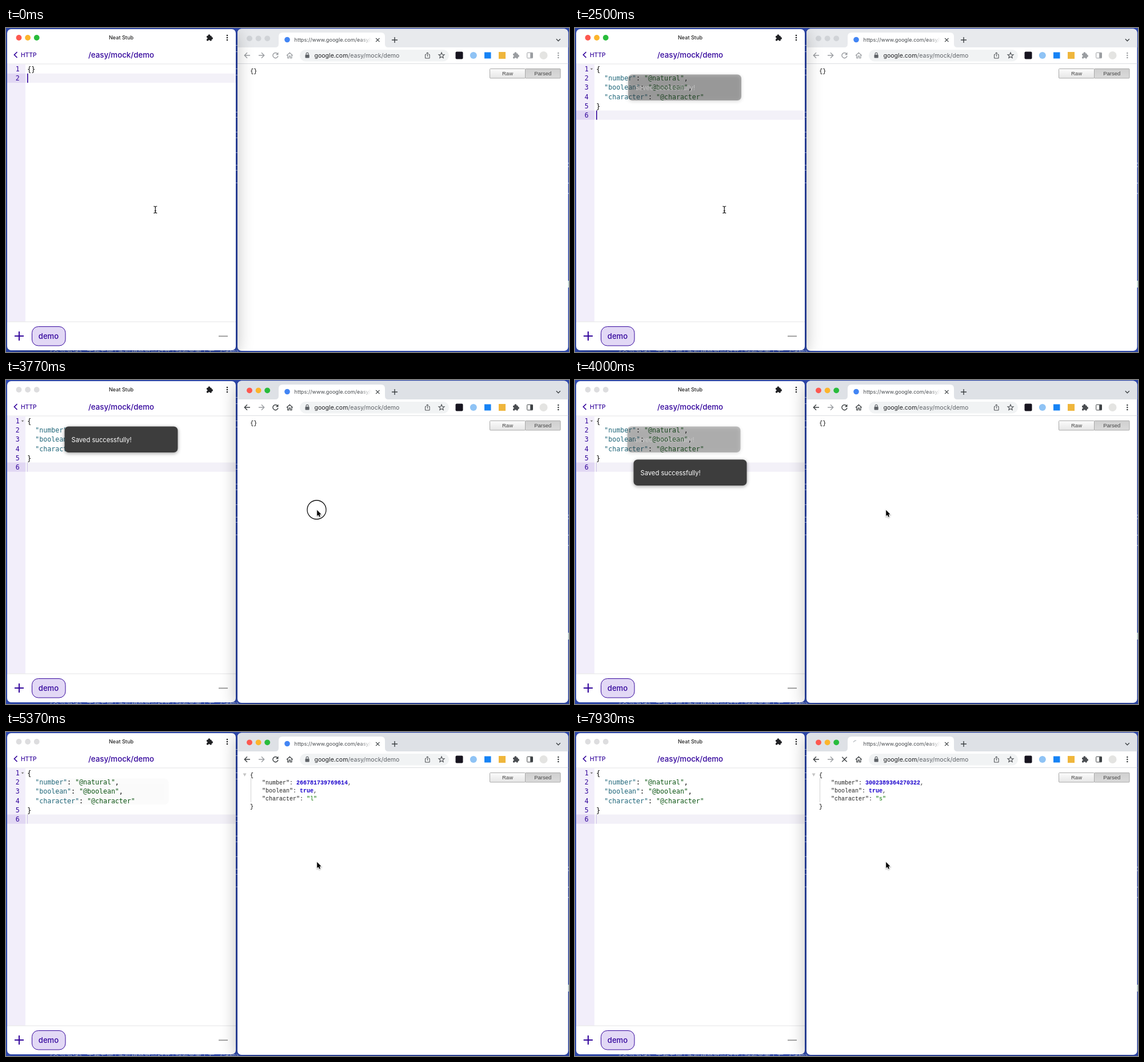
An HTML page with a canvas that plays this animation: 985 by 568 pixels, repeating every 8000 ms.

```html
<!DOCTYPE html>
<html lang="en">
<head>
<meta charset="utf-8">
<style>
html, body { margin: 0; width: 985px; height: 568px; overflow: hidden; }
canvas { display: block; }
</style>
</head>
<body>
<canvas id="stage" width="985" height="568"></canvas>
<script>
const ctx = document.getElementById('stage').getContext('2d');
const LOOP = 8000, FOCUS_SWAP = 3740, PASTE = 1930;
const PURPLE = '#33059c', KEY = '#1f6679', STRING = '#0b5512';
const UI = 'Inter, sans-serif', CODE = '"DejaVu Sans Mono", monospace';
const JSON_FONT = '"Liberation Mono", monospace';
const ROW = 16.2, ROW_TOP = 63.6;
const LOADS = [[4430, 4760, 5030], [6030, 6370, 6600], [7730, 8100, 8400]];
const TOASTS = [[2440, 3912], [3775, 5243]];
const CARET = [[0, 500], [1000, 1530], [PASTE, 3000], [3530, FOCUS_SWAP]];

const clamp = v => Math.max(0, Math.min(1, v));
const within = (t, [a, b]) => t >= a && t < b;

function text(s, x, y, size, color, { font = UI, weight = 400, align = 'left' } = {}) {
  ctx.font = `${weight} ${size}px ${font}`;
  ctx.textAlign = align;
  ctx.fillStyle = color;
  ctx.fillText(s, x, y);
  return ctx.measureText(s).width;
}

// Draws [text, color, weight] pieces one after another.
function pieces(list, x, y, size, font) {
  for (const [s, color, weight] of list) x += text(s, x, y, size, color, { font, weight });
}

function rect(x, y, w, h, color) {
  ctx.fillStyle = color;
  ctx.fillRect(x, y, w, h);
}

function box(x, y, w, h, r, fill, stroke) {
  ctx.beginPath();
  ctx.roundRect(x, y, w, h, r);
  if (fill) { ctx.fillStyle = fill; ctx.fill(); }
  if (stroke) { ctx.strokeStyle = stroke; ctx.lineWidth = 1; ctx.stroke(); }
}

function dot(x, y, r, color) {
  ctx.beginPath();
  ctx.arc(x, y, r, 0, 7);
  ctx.fillStyle = color;
  ctx.fill();
}

function path(d, x, y, color, width) {
  const p = new Path2D(d);
  ctx.save();
  ctx.translate(x, y);
  if (width) {
    ctx.strokeStyle = color;
    ctx.lineWidth = width;
    ctx.stroke(p);
  } else {
    ctx.fillStyle = color;
    ctx.fill(p);
  }
  ctx.restore();
}

function shadowed(color, blur, dy, draw) {
  ctx.save();
  ctx.shadowColor = color;
  ctx.shadowBlur = blur;
  ctx.shadowOffsetY = dy;
  draw();
  ctx.restore();
}

function trafficLights(x, y, active) {
  const colors = active ? ['#fd5850', '#fcb52c', '#28bc3c'] : Array(3).fill(x < 400 ? '#dddddf' : '#d0d3d7');
  colors.forEach((c, i) => dot(x + 15.6 * i, y, 4.9, c));
}

function moreDots(x, y, color) {
  for (const d of [-4, 0, 4]) dot(x, y + d, 1.3, color);
}

function puzzle(x, y, color) {
  box(x - 5, y - 3.2, 8.8, 8.6, 1, color);
  dot(x - .6, y - 3.7, 2, color);
  dot(x + 4, y + 1, 2, color);
  dot(x - 5, y + 1, 1.6, '#fff');
  dot(x - .6, y + 5.6, 1.6, '#fff');
}

function wallpaper() {
  rect(0, 0, 985, 568, '#304bb2');
  for (const y of [30, 41, 71, 82, 147, 156, 182, 192, 218, 240, 249, 271]) rect(401, y, 4, 1, '#a9b9ee');
  for (const y of [236, 242, 271, 289]) rect(983, y, 2, 2, '#7f9be0');
  rect(983, 443, 2, 12, '#c3e0e0');
  text('《会议沟通》 下载专家 | 手机相册可以打开 | 就在画面上有 《通知》', 70, 574, 11.5, '#a9b8d8',
    { font: '"Noto Sans CJK SC", "Noto Sans CJK", sans-serif' });
}

function codeLines(t) {
  if (t < PASTE) return [[['{}', '#000']], []];
  const pair = (key, value, end) => [['  ', '#000'], [`"${key}"`, KEY], [': ', '#000'], [`"@${value}"`, STRING], [end, '#000']];
  return [
    [['{', '#000']],
    pair('number', 'natural', ','),
    pair('boolean', 'boolean', ','),
    pair('character', 'character', ''),
    [['}', '#000']],
    []
  ];
}

function toast(t, [start, end], y) {
  const enter = clamp((t - start) / 150), leave = clamp((t - end) / 130);
  const shown = enter * (1 - leave);
  if (shown <= 0) return;
  const x = 102.5 - 16 * (1 - shown);
  ctx.save();
  ctx.globalAlpha = shown;
  shadowed('rgba(0,0,0,.4)', 6, 1.5, () => box(x, y, 198, 45.5, 7, '#3d3d3d'));
  text('Saved successfully!', x + 12, y + 27, 11.2, '#fff');
  ctx.restore();
}

function editor(t, active) {
  box(2, 2, 400, 563, 7, '#fff');
  ctx.save();
  ctx.shadowColor = 'transparent';
  trafficLights(22.5, 17, active);
  text('Neat Stub', 201.5, 20.3, 9.1, '#222', { weight: 500, align: 'center' });
  puzzle(356, 17, '#202124');
  moreDots(387, 17, '#202124');
  path('M5 -5 L0 0 L5 5', 14.5, 47, PURPLE, 1.7);
  text('HTTP', 26, 50.8, 10.2, PURPLE, { weight: 500 });
  text('/easy/mock/demo', 201.5, 52.2, 13.3, PURPLE, { weight: 500, align: 'center' });

  rect(2, 62.5, 400, 1, '#e3e3e5');
  rect(2, 63.5, 32, 451, '#f2eefa');
  const lines = codeLines(t), last = lines.length - 1;
  const lastTop = ROW_TOP + ROW * last;
  rect(2, lastTop, 32, ROW, '#e1d7f3');
  rect(34, lastTop, 368, ROW, '#f3f1f8');
  lines.forEach((line, i) => {
    const y = ROW_TOP + ROW * i + 12.4;
    text(i + 1, 20.3, y, 11.6, PURPLE, { font: CODE, align: 'center' });
    pieces(line, 37.3, y, 11.6, CODE);
  });
  if (last > 1) path('M-2.3 -1.2 H2.3 L0 1.6 Z', 29, 72, '#777');
  if (!active) rect(37, lastTop, 1, ROW, '#cfc3e8');
  else if (CARET.some(span => within(t, span))) rect(37, lastTop, 1.6, ROW, PURPLE);

  rect(2, 514.5, 400, 1, '#e3e3e5');
  path('M-8 0 H8 M0 -8 V8', 23, 540, PURPLE, 2);
  box(45.5, 523.5, 58.5, 33.5, 11, '#e2d8f5', PURPLE);
  text('demo', 74.5, 545.2, 13.1, PURPLE, { weight: 500, align: 'center' });
  path('M-8 0 H8', 380, 540.3, '#8b8b8b', 1.6);

  toast(t, TOASTS[0], 81.5);
  toast(t, TOASTS[1], t < 4085 ? 139.5 : 81.5);
  ctx.restore();
}

function tabIcon(t, load) {
  if (!load) return dot(492, 20.5, 4.8, '#4285f4');
  const since = t - load[0], waiting = t < load[1];
  const mid = waiting ? -1.15 - since / 1320 * 2 * Math.PI : since / 120;
  const half = waiting ? .55 : 1.2;
  ctx.beginPath();
  ctx.arc(492, 20.5, 5.6, mid - half, mid + half);
  ctx.strokeStyle = waiting ? '#bdc1c6' : '#1a73e8';
  ctx.lineWidth = 1.3;
  ctx.stroke();
}

function toolbar(active, loading) {
  const ink = active ? '#3c4043' : '#9a9da1', dark = '#4a4d51';
  path('M5 0 H-4.5 M0 -4.7 L-4.7 0 L0 4.7', 422, 48, ink, 1.4);
  path('M-5 0 H4.5 M0 -4.7 L4.7 0 L0 4.7', 447, 48, '#9a9da1', 1.4);
  if (loading) path('M-4.2 -4.2 L4.2 4.2 M4.2 -4.2 L-4.2 4.2', 471.5, 48, ink, 1.4);
  else {
    path('M3.6 -2.8 A4.6 4.6 0 1 0 4.5 1', 471.5, 48, ink, 1.4);
    path('M5 -5.4 V-.8 H.4 Z', 471.5, 48, ink);
  }
  path('M-5.3 .2 L0 -4.8 L5.3 .2 M-3.6 -1 V4.6 H-1.2 V1.2 H1.2 V4.6 H3.6 V-1', 496.3, 48, ink, 1.2);

  box(514, 38, 261, 20.5, 10.2, '#f1f3f4');
  box(523.5, 46.7, 7.2, 5.8, 1, '#5f6368');
  path('M-2 0 V-1.6 A2 2 0 0 1 2 -1.6 V0', 527.1, 47, '#5f6368', 1.1);
  pieces([['google.com', '#202124'], ['/easy/mock/demo', '#5f6368']], 539.5, 51.8, 10.55, UI);
  path('M-2 -1.5 H-3.8 V5 H3.8 V-1.5 H2 M0 2 V-5 M-2.3 -2.9 L0 -5.2 L2.3 -2.9', 737.3, 48, dark, 1);
  let star = '';
  for (let i = 0; i < 10; i++) {
    const a = i * Math.PI / 5 - Math.PI / 2, r = i % 2 ? 2.3 : 5.3;
    star += `${i ? 'L' : 'M'}${r * Math.cos(a)} ${r * Math.sin(a)} `;
  }
  path(star + 'Z', 762, 48.3, dark, 1.1);

  box(786.5, 41.5, 13, 13, 2, '#17141f');
  dot(817.8, 48, 6, '#8fc3f5');
  box(837, 42.5, 11.5, 11, 0, '#1683f5');
  box(862, 42, 12, 12, 0, '#efb63c');
  puzzle(892, 48, active ? '#4a4d51' : '#9a9da1');
  box(911.7, 43.2, 9.8, 9.6, 1, null, ink);
  rect(917.2, 43.5, 4.3, 9, ink);
  dot(940.5, 48, 7, '#e4e4e2');
  moreDots(966.3, 48, ink);
}

function button(label, x, w, top, bottom) {
  const shade = ctx.createLinearGradient(0, 71, 0, 88);
  shade.addColorStop(0, top);
  shade.addColorStop(1, bottom);
  box(x, 71.5, w, 16.5, 1, shade, '#a9a9a9');
  text(label, x + w / 2, 83, 9.5, '#444', { font: '"Liberation Sans", sans-serif', align: 'center' });
}

function page(t) {
  if (t < LOADS[0][1]) text('{}', 427.3, 79, 10, '#000', { font: JSON_FONT });
  else {
    const [number, letter] = t < LOADS[1][1] ? ['266781739769614', 'l'] : ['3002389364270322', 's'];
    const rows = [
      ['number', number, '#1a01cc', 700, ','],
      ['boolean', 'true', '#1a01cc', 700, ','],
      ['character', `"${letter}"`, '#0b7500', 400, '']
    ];
    path('M-3 -2.5 H3 L0 3 Z', 417.6, 75, '#c4c4c4');
    text('{', 427, 78.6, 10, '#000', { font: JSON_FONT });
    rect(428, 81, 1, 42, '#d2d2d2');
    rows.forEach(([key, value, color, weight, end], i) =>
      pieces([[`"${key}": `, '#222'], [value, color, weight], [end, '#222']], 448, 92 + 14 * i, 10, JSON_FONT));
    text('}', 427, 134.4, 10, '#000', { font: JSON_FONT });
  }
  button('Raw', 846.5, 62, '#fcfcfc', '#e6e6e6');
  button('Parsed', 908.5, 61.5, '#cfcfcf', '#dadada');
}

function browser(t, active) {
  const load = LOADS.find(([start, , end]) => within(t, [start, end]));
  const strip = active ? '#dee1e6' : '#e8eaed';
  box(405, 1.5, 578.5, 564.5, 7, '#fff');
  ctx.save();
  ctx.shadowColor = 'transparent';
  box(405, 1.5, 578.5, 32.5, [7, 7, 0, 0], strip);
  trafficLights(426, 18.3, active);
  path('M-6 26 Q0 26 0 20 V7 Q0 0 7 0 H179 Q186 0 186 7 V20 Q186 26 192 26 Z', 477, 8, '#fff');
  tabIcon(t, load);
  const fade = ctx.createLinearGradient(618, 0, 640, 0);
  fade.addColorStop(0, '#45494d');
  fade.addColorStop(1, 'rgba(69,73,77,0)');
  text('https://www.google.com/easy/m', 504.5, 24.2, 9.15, fade);
  path('M-3.2 -3.2 L3.2 3.2 M3.2 -3.2 L-3.2 3.2', 650.3, 21, '#3c4043', 1.2);
  path('M-5 0 H5 M0 -5 V5', 680, 21, '#3c4043', 1.4);
  path('M-3.5 -1.7 L0 1.8 L3.5 -1.7', 966.3, 21, '#3c4043', 1.3);
  toolbar(active, load);
  rect(405, 62, 578.5, 1, '#dcdee1');
  page(t);
  ctx.restore();
}

function pointer(t) {
  const u = clamp((t - 3200) / 500);
  const p = u < .5 ? 4 * u ** 3 : 1 - (2 - 2 * u) ** 3 / 2;
  const x = 261.3 + 282.9 * p, y = 318.5 - 90.5 * p;
  if (within(t, [3720, 3870])) {
    ctx.beginPath();
    ctx.arc(543.5, 227.5, 16.5, 0, 7);
    ctx.strokeStyle = '#111';
    ctx.lineWidth = 1.3;
    ctx.stroke();
  }
  if (x < 402) {
    const beam = 'M-3 -6 Q0 -6 0 -4 Q0 -6 3 -6 M0 -4.5 V4.5 M-3 6 Q0 6 0 4 Q0 6 3 6 M-1.5 2 H1.5';
    path(beam, x, y, '#fff', 2.6);
    path(beam, x, y, '#111', 1.2);
  } else {
    const arrow = 'M0 0 V10.6 L2.4 8.5 L4 12 L5.8 11.2 L4.3 7.8 L7.3 7.6 Z';
    shadowed('rgba(0,0,0,.35)', 2, 1, () => path(arrow, x, y, '#fff', 1.8));
    path(arrow, x, y, '#000');
  }
}

function draw(t) {
  wallpaper();
  const browserFront = t >= FOCUS_SWAP;
  const layers = browserFront ? [editor, browser] : [browser, editor];
  layers.forEach((layer, i) => {
    const front = i === 1;
    shadowed(front ? 'rgba(0,0,0,.3)' : 'rgba(0,0,0,.15)', front ? 30 : 8, front ? 6 : 1, () => layer(t, front));
  });
  pointer(t);
}

const began = performance.now();
function tick() {
  draw((performance.now() - began) % LOOP);
  requestAnimationFrame(tick);
}
tick();
</script>
</body>
</html>
```
